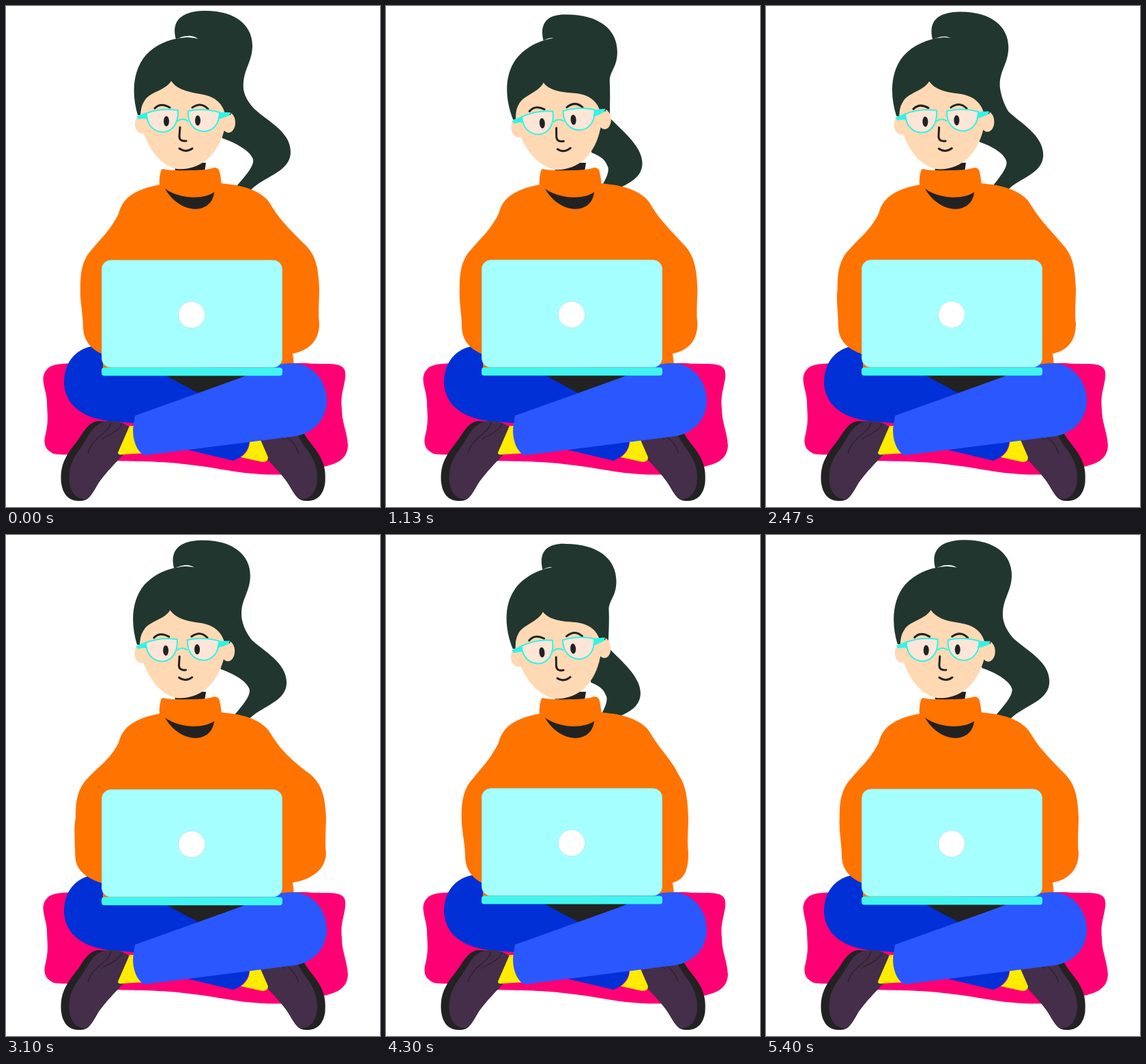
These frames come from a looping animation (548x735 px, 5460 ms). An HTML page:

```html
<!DOCTYPE html>
<html lang="en">
<head>
<meta charset="utf-8">
<title>Working on a laptop</title>
<style>
  html, body { margin: 0; width: 100%; height: 100%; overflow: hidden; background: #fff; }
  svg { display: block; width: 100%; height: 100%; }
  .hair { fill: #21362f; }
  .skin { fill: #ffd9b3; }
  .dark { fill: #222; }
  .knit { fill: #ff7300; }
  .sock { fill: #ffec00; }
  .line { fill: none; stroke: #222; stroke-width: 3; stroke-linecap: round; }
  .lens { fill: #fde6d8; stroke: #32f3e6; stroke-width: 2; }
  .rim { fill: #32f3e6; }
</style>
</head>
<body>
<svg viewBox="0 0 548 735">
  <defs>
    <g id="shoe">
      <path class="dark" d="M135 609C118 611 112 630 100 644C84 664 79 678 81 700C84 720 95 727 110 726C121 726 126 716 133 704C142 688 163 668 174 655L181 618C172 611 158 608 150 610Z"/>
      <path fill="#442e49" d="M150 609C125 612 122 632 108 650C95 667 91 682 93 700C96 716 103 722 115 724C123 721 127 714 133 704C142 688 163 668 174 655L181 618C172 611 160 608 150 609Z"/>
      <path d="M154 611C150 628 127 632 120 656M171 612C163 626 150 629 140 636" fill="none" stroke="#2c2030" stroke-width="1.3"/>
    </g>
  </defs>

  <path fill="#ff0074" d="M62 531C72 523 92 525 110 524H440C465 527 495 520 497 537C499 552 489 568 492 590C492 612 500 624 501 645C500 668 480 672 466 676C435 688 400 690 350 685C300 678 270 670 200 668L150 667C115 652 90 661 70 657C55 650 55 640 58 628C63 608 60 595 60 580C59 560 47 545 62 531Z"/>
  <path fill="#0030d6" d="M132 498C100 502 84 525 85 555C88 588 115 604 150 609L188 612L200 635L270 652L333 667C347 662 357 650 357 636L300 570L236 535L150 510Z"/>
  <path id="tail" class="hair"/>
  <path class="dark" d="M247 230H293L291 243H248Z"/>

  <g id="head">
    <ellipse class="skin" cx="199" cy="173" rx="10" ry="14"/>
    <ellipse class="skin" cx="326" cy="171" rx="10" ry="15"/>
    <path class="skin" d="M202 128L197 165C202 198 220 232 250 239C288 242 312 215 321 178L322 140L260 100Z"/>
    <path class="hair" d="M193 160C184 130 185 95 205 72C222 54 245 47 265 46C290 47 310 58 322 80C335 105 338 130 329 160L321 158C317 142 305 132 284 129C265 126 250 122 242 110C234 124 210 126 203 139C198 146 198 153 197 160Z"/>
    <path class="line" d="M218 150Q227 141 240 149M273 149Q286 140 296 151"/>
    <path class="lens" d="M206 157Q228 149 252 153C253 174 242 185 229 185C214 184 206 172 206 157Z"/>
    <path class="lens" d="M267 154Q290 149 313 156C313 173 303 184 290 184C275 183 266 172 267 154Z"/>
    <path class="lens" style="fill:none" d="M251 169Q259 163 267 169"/>
    <path class="rim" d="M191 162L206 156L208 166L203 165L194 166Z"/>
    <path class="rim" d="M329 156L313 156L310 166L316 165L327 161Z"/>
    <ellipse class="dark" cx="235" cy="169" rx="4" ry="7.5"/>
    <ellipse class="dark" cx="281" cy="168" rx="4" ry="7.5"/>
    <path class="line" d="M255 178L254 191Q254 199 264 198M254 209Q263 216 273 209"/>
  </g>

  <path id="body" class="knit"/>
  <path class="knit" d="M230 239Q240 242 270 241Q295 241 305 237Q312 237 313 244Q317 260 315 275H226Q223 255 227 242Q228 239 230 239Z"/>
  <path class="dark" d="M233 268C255 284 290 284 305 273C302 306 256 308 233 268Z"/>

  <use href="#shoe"/>
  <use href="#shoe" transform="matrix(-1 0 0 1 548.5 0)"/>
  <path class="sock" d="M181 616L164 655Q164 659 170 658L203 656L190 616Z"/>
  <path class="sock" d="M357 638L371 632L384 662Q384 669 376 669L344 662Q357 653 357 638Z"/>
  <path class="dark" d="M230 540H360L284 569Z"/>
  <path fill="#2b57ff" d="M189 601L345 545C375 531 400 524 420 524C450 525 470 550 470 580C469 606 453 625 425 631L204 659C193 657 183 635 187 613Z"/>

  <g id="laptop">
    <rect x="140.5" y="373" width="264" height="157" rx="13" fill="#a6ffff" stroke="#8eeeee"/>
    <rect x="140" y="530.5" width="265" height="12" rx="4" fill="#40f5f0"/>
    <circle cx="272" cy="453" r="19.5" fill="#fff" stroke="#b5dede" stroke-width=".7"/>
  </g>
</svg>

<script>
const LOOP = 5460;
const $ = id => document.getElementById(id);

// Hair behind the head, swung right and swung left
const hairRight = 'M249 49C243 28 250 8 290 7C335 6 362 28 361 60C360 85 346 95 348 122C350 135 358 145 365 152C385 170 417 185 417 214C417 245 375 250 357 272C351 268 344 266 338 264C350 250 364 235 362 225C358 212 335 200 317 194L290 110L283 50C276 42 262 42 249 49Z';
const hairLeft = 'M229 51C223 25 235 12 262 13C310 13 337 35 337 68C337 90 327 95 326 108C327 130 325 150 325 165C335 178 372 205 372 232C372 252 355 260 344 265C335 262 325 262 316 261C322 250 325 240 321 235C318 225 308 220 300 217L285 115L250 53C243 45 240 46 229 51Z';

// [time, value] pairs
const swing = [[0, 0], [700, .58], [1360, 1], [1630, .93], [2470, .24], [2860, 0], [3670, .76], [4170, 1], [4300, .98], [5400, .04]];
const leftArm = [[0, 0], [640, -18], [700, -17], [1380, 3], [1630, 1], [2030, -15], [2470, -7], [2760, 0], [3330, -18], [3670, -11], [4150, 4], [4300, 3], [4850, -15], [5400, -2]];
const rightArm = [[0, 0], [600, 11], [700, 10], [1630, -16], [1880, -17], [2470, -5], [3250, 11], [3670, 2], [4300, -16], [4600, -17], [5400, -1]];

// Smooth looping curve that is flat at its turning points
function sample(keys, t) {
  const n = keys.length;
  const key = i => {
    const [time, value] = keys[(i + n) % n];
    return [time + LOOP * Math.floor(i / n), value];
  };
  const slope = i => {
    const [a, b, c] = [key(i - 1), key(i), key(i + 1)];
    const before = (b[1] - a[1]) / (b[0] - a[0]);
    const after = (c[1] - b[1]) / (c[0] - b[0]);
    return before * after > 0 ? 2 * before * after / (before + after) : 0;
  };
  let i = n - 1;
  while (keys[i][0] > t) i--;
  const [t0, v0] = key(i), [t1, v1] = key(i + 1);
  const d = t1 - t0, u = (t - t0) / d, w = 1 - u;
  return w * w * (1 + 2 * u) * v0 + u * u * (3 - 2 * u) * v1
    + d * u * w * (w * slope(i) - u * slope(i + 1));
}

function blend(from, to, k) {
  const ends = to.match(/\d+/g);
  let i = 0;
  return from.replace(/\d+/g, a => (+a + (ends[i++] - a) * k).toFixed(2));
}

function sweater(l, r) {
  return `M226 262C200 267 172 275 165 305
    C152 330 ${140 + .4 * l} 340 ${127 + .55 * l} 356
    C${110 + .6 * l} 373 ${109 + .6 * l} 395 ${109 + .6 * l} 415
    C${108 + .8 * l} 430 ${113 + l} 455 ${113 + l} 470
    C${113 + l} 495 ${130 + .5 * l} 506 142 511
    L142 535L422 526L420 510
    C${445 + .4 * r} 505 ${459 + r} 490 ${459 + r} 466
    C${457 + r} 450 ${459 + r} 430 ${459 + r} 415
    C${458 + r} 380 ${452 + .9 * r} 365 ${440 + .7 * r} 352
    C420 332 402 315 390 295C380 275 360 268 338 263L315 260Z`;
}

function draw() {
  const t = performance.now() % LOOP;
  const h = sample(swing, t), r = sample(rightArm, t);
  $('tail').setAttribute('d', blend(hairRight, hairLeft, h));
  $('head').setAttribute('transform', `rotate(${-5.5 * h} 265 240)`);
  $('body').setAttribute('d', sweater(sample(leftArm, t), r));
  $('laptop').setAttribute('transform', `translate(0 ${.07 * r})`);
  requestAnimationFrame(draw);
}
draw();
</script>
</body>
</html>
```
